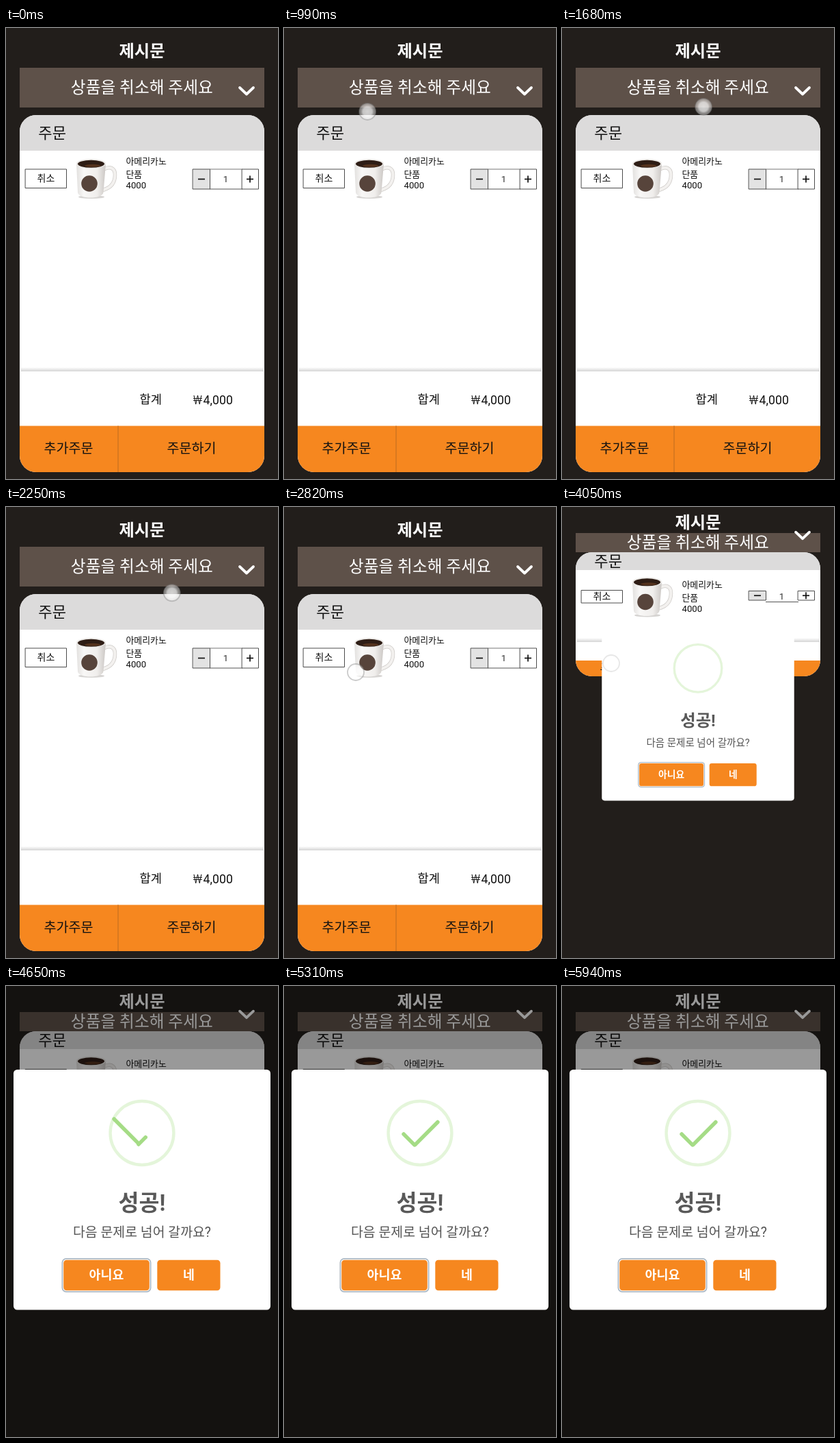
Recreate the animation shown at these times as an HTML page with a canvas. Size 398 by 658 pixels, loop 5970 ms.

```html
<!DOCTYPE html>
<html lang="ko">
<head>
<meta charset="utf-8">
<style>
html, body { margin: 0; width: 100%; height: 100%; overflow: hidden; background: #221e1b; }
canvas { display: block; width: 398px; height: 658px; }
</style>
</head>
<body>
<canvas id="stage"></canvas>
<script>
const W = 398, H = 658, LOOP = 5970;
const POPUP_AT = 4034, DIM_AT = 4055, CHECK_AT = 4133;
const EM = 17.69;
const FONT = "Roboto, 'Noto Sans CJK KR', 'Noto Sans CJK', sans-serif";
const ORANGE = '#f6871f';

const canvas = document.getElementById('stage');
const ctx = canvas.getContext('2d');
const dpr = window.devicePixelRatio || 1;
canvas.width = W * dpr;
canvas.height = H * dpr;

// Vertical positions of the page, before and after the body collapses
const FULL = {
  title: 33.3, bar: 58, barEnd: 116, prompt: 86.3, chevron: 91.5,
  card: 127, head: 179, headText: 153, total: 501, totalText: 541.3,
  foot: 580.5, end: 648, footText: 613.3,
  cancel: 206, cancelEnd: 233.5, mug: 0, info: 0,
  qty: 206, qtyEnd: 235, inputEnd: 235, qtyText: 220.5
};
const FLAT = {
  title: 22.8, bar: 38, barEnd: 66, prompt: 51.3, chevron: 41.2,
  card: 66, head: 92, headText: 79, total: 197, totalText: 210,
  foot: 224, end: 247, footText: 235,
  cancel: 121.5, cancelEnd: 140, mug: -88.5, info: -81.5,
  qty: 122.5, qtyEnd: 136, inputEnd: 138.5, qtyText: 130
};

// Touch path: time, x, y
const PATH = [
  [750, 94, 122], [990, 122, 122], [1680, 207, 115], [2130, 255, 115],
  [2820, 105, 241], [3300, 72, 228], [4200, 72, 228]
];

const clamp = v => Math.max(0, Math.min(1, v));
const mix = (a, b, k) => a + (b - a) * k;

// CSS "ease": cubic-bezier(.25, .1, .25, 1)
function ease(x) {
  const bez = (a, b, u) => 3 * a * u * (1 - u) ** 2 + 3 * b * u * u * (1 - u) + u ** 3;
  let lo = 0, hi = 1;
  for (let i = 0; i < 24; i++) {
    const mid = (lo + hi) / 2;
    if (bez(.25, .25, mid) < x) lo = mid; else hi = mid;
  }
  return bez(.1, 1, lo);
}

// Keys are [offset, ...values]; each segment is eased on its own
function keyframes(keys, p, curve = ease) {
  if (p <= keys[0][0]) return keys[0].slice(1);
  for (let i = 1; i < keys.length; i++) {
    const a = keys[i - 1], b = keys[i];
    if (p <= b[0]) {
      const k = curve((p - a[0]) / (b[0] - a[0]));
      return a.slice(1).map((v, j) => mix(v, b[j + 1], k));
    }
  }
  return keys[keys.length - 1].slice(1);
}

function text(str, x, cy, size, { color = '#111', weight = 400, align = 'left', mid = .355 } = {}) {
  ctx.font = `${weight} ${size}px ${FONT}`;
  ctx.fillStyle = color;
  ctx.textAlign = align;
  ctx.fillText(str, x, cy + mid * size);
}

function rect(x, y, x2, y2, color) {
  ctx.fillStyle = color;
  ctx.fillRect(x, y, x2 - x, y2 - y);
}

function frame(x, y, x2, y2, color = '#4c4c4c') {
  ctx.strokeStyle = color;
  ctx.lineWidth = 1;
  ctx.strokeRect(x, y, x2 - x, y2 - y);
}

function round(x, y, x2, y2, r, color) {
  ctx.beginPath();
  ctx.roundRect(x, y, x2 - x, y2 - y, r);
  ctx.fillStyle = color;
  ctx.fill();
}

function line(points, width, color, cap = 'butt') {
  ctx.beginPath();
  points.forEach(([x, y]) => ctx.lineTo(x, y));
  ctx.strokeStyle = color;
  ctx.lineWidth = width;
  ctx.lineCap = cap;
  ctx.lineJoin = cap === 'round' ? 'round' : 'miter';
  ctx.stroke();
}

function ellipse(x, y, rx, ry, color) {
  ctx.beginPath();
  ctx.ellipse(x, y, rx, ry, 0, 0, 7);
  ctx.fillStyle = color;
  ctx.fill();
}

function mug(dy) {
  ctx.save();
  ctx.translate(0, dy);
  ellipse(125, 246.5, 19, 2.5, '#d6d4d2');

  const handle = new Path2D('M143 206 C153 201 159.5 205 159.5 214 C159.5 226 153 233 143 236');
  ctx.lineCap = 'round';
  ctx.strokeStyle = '#cfccc9';
  ctx.lineWidth = 5.5;
  ctx.stroke(handle);
  ctx.strokeStyle = '#f3f1ef';
  ctx.lineWidth = 4;
  ctx.stroke(handle);

  const shade = ctx.createLinearGradient(103, 0, 146, 0);
  shade.addColorStop(0, '#e2e0de');
  shade.addColorStop(.25, '#f8f7f6');
  shade.addColorStop(.7, '#f0eeec');
  shade.addColorStop(1, '#cbc7c4');
  ctx.fillStyle = shade;
  ctx.fill(new Path2D('M103 198 L105 240 C106 250 141 250 142.5 240 L146 198 Z'));

  ellipse(124.5, 198, 21.5, 7, '#eae8e5');
  ellipse(124.5, 198.3, 19.5, 5.5, '#2e1d15');
  ellipse(127, 200.8, 12, 2, '#54321d');
  ellipse(122, 227, 11.8, 11.8, '#57443b');
  ctx.restore();
}

function quantity(L) {
  const y = (L.qty + L.qtyEnd) / 2;
  rect(274, L.qty, 298.5, L.qtyEnd, '#e3e3e3');
  frame(273.5, L.qty, 298.5, L.qtyEnd);
  frame(345.5, L.qty, 369.5, L.qtyEnd);
  if (L === FULL) line([[298, L.qty], [346, L.qty]], 1, '#777');
  line([[298, L.inputEnd], [346, L.inputEnd]], 1, '#555');
  line([[281, y], [291, y]], 1.7, '#111');
  line([[352, y], [362, y]], 1.7, '#111');
  line([[357, y - 5], [357, y + 5]], 1.7, '#111');
  text('1', 321.5, L.qtyText, 13.3, { align: 'center', color: '#333' });
}

function page(L) {
  const center = { align: 'center' };
  rect(0, 0, W, H, '#221e1b');
  text('제시문', 199, L.title, 24.3, { ...center, color: '#fff', weight: 700 });
  rect(20, L.bar, 378, L.barEnd, '#5e5149');
  text('상품을 취소해 주세요', 198.8, L.prompt, 23.7, { ...center, color: '#fff' });
  const c = L.chevron;
  line([[342, c - 4.5], [352, c + 5], [362, c - 4.5]], 3.8, '#fff', 'round');

  ctx.save();
  ctx.beginPath();
  ctx.roundRect(20, L.card, 358, L.end - L.card, 24);
  ctx.clip();
  rect(20, L.card, 378, L.end, '#fff');
  rect(20, L.card, 378, L.head, '#dcdbdb');
  text('주문', 47.3, L.headText, 22.1);

  const shadow = ctx.createLinearGradient(0, L.total - 6, 0, L.total);
  shadow.addColorStop(0, 'rgba(0,0,0,0)');
  shadow.addColorStop(1, 'rgba(0,0,0,.17)');
  rect(22, L.total - 6, 377, L.total, shadow);
  text('합계', 195.5, L.totalText, 17.6);
  text('₩', 273.8, L.totalText + 1, 17.7, { weight: 300 });
  text('4,000', 288.6, L.totalText + 1, 17.7);

  rect(20, L.foot, 378, L.end, ORANGE);
  line([[164, L.foot], [164, L.end]], 1.5, '#cf7420');
  text('추가주문', 91.5, L.footText, 19.6, center);
  text('주문하기', 271.5, L.footText, 19.6, center);
  ctx.restore();

  frame(28.5, L.cancel, 88.5, L.cancelEnd);
  text('취소', 58.5, (L.cancel + L.cancelEnd) / 2 - .4, 14, center);
  mug(L.mug);
  text('아메리카노', 175.5, 194.5 + L.info, 12.9);
  text('단품', 175.5, 213.5 + L.info, 12.9);
  text('4000', 175.5, 229.5 + L.info, 13.2);
  quantity(L);
}

function bar(cx, cy, width, angle) {
  if (width <= 0) return;
  ctx.save();
  ctx.translate(199 + (cx - 2.5) * EM, 214.5 + (cy - 2.5) * EM);
  ctx.rotate(angle);
  const w = width * EM / 2, h = .3125 * EM / 2;
  round(-w, -h, w, h, Math.min(.125 * EM, w), '#a5dc86');
  ctx.restore();
}

function check(t) {
  ctx.beginPath();
  ctx.arc(199, 214.5, 2.625 * EM, 0, 7);
  ctx.strokeStyle = 'rgba(165,220,134,.3)';
  ctx.lineWidth = .25 * EM;
  ctx.stroke();

  const p = clamp((t - CHECK_AT) / 750);
  const [left, top, tip] = keyframes([
    [0, .0625, 1.1875, 0], [.54, .125, 1.0625, 0], [.7, -.375, 2.1875, 3.125],
    [.84, 1.3125, 3, 1.0625], [1, .8125, 2.875, 1.5625]
  ], p);
  const [right, topL, long] = keyframes([
    [0, 2.875, 3.375, 0], [.65, 2.875, 3.375, 0],
    [.84, 0, 2.1875, 3.4375], [1, .5, 2.375, 2.9375]
  ], p);
  bar(left + tip / 2, top + .156, tip, Math.PI / 4);
  bar(5 - right - long / 2, topL + .156, long, -Math.PI / 4);
}

function popup(t) {
  const [scale] = keyframes([[0, .7], [.45, 1.05], [.8, .95], [1, 1]], clamp((t - POPUP_AT) / 300));
  const center = { align: 'center' };
  const label = { ...center, color: '#fff', weight: 700 };
  ctx.save();
  ctx.translate(199, 297.2);
  ctx.scale(scale, scale);
  ctx.translate(-199, -297.2);
  round(11, 122, 387, 472.5, 5.5, '#fff');
  check(t);
  text('성공!', 199, 316, 32.6, { ...center, color: '#595959', weight: 600 });
  text('다음 문제로 넘어 갈까요?', 199, 359.2, 19.4, { ...center, color: '#545454' });
  round(81.5, 397, 212.5, 447, 6.5, '#adbac6');
  round(83.3, 398.8, 210.7, 445.2, 5, '#fff');
  round(84.2, 399.7, 209.8, 444.3, 4.5, ORANGE);
  round(221.3, 399.7, 313.5, 444.3, 4.5, ORANGE);
  text('아니요', 147, 421.8, 18.4, label);
  text('네', 267.5, 421.8, 18.4, label);
  ctx.restore();
}

function touch(t) {
  const alpha = clamp((t - 750) / 80) * (1 - clamp((t - 3990) / 110));
  if (alpha <= 0) return;
  const smooth = k => k * k * (3 - 2 * k);
  const [x, y] = keyframes(PATH, t, t > 2130 ? smooth : k => k);
  ctx.save();
  ctx.globalAlpha = alpha;
  const glow = ctx.createRadialGradient(x, y, 0, x, y, 12);
  glow.addColorStop(0, 'rgba(255,255,255,.8)');
  glow.addColorStop(.55, 'rgba(255,255,255,.74)');
  glow.addColorStop(.8, 'rgba(255,255,255,.48)');
  glow.addColorStop(1, 'rgba(255,255,255,.38)');
  ellipse(x, y, 12, 12, glow);
  ctx.beginPath();
  ctx.arc(x, y, 12, 0, 7);
  ctx.strokeStyle = 'rgba(130,130,130,.42)';
  ctx.lineWidth = 1.8;
  ctx.stroke();
  ctx.restore();
}

function draw(t) {
  ctx.setTransform(dpr, 0, 0, dpr, 0, 0);
  const open = t >= POPUP_AT;
  page(open ? FLAT : FULL);
  if (open) {
    const dim = .4 * ease(clamp((t - DIM_AT) / 100));
    rect(0, 0, W, H, `rgba(0,0,0,${dim})`);
    popup(t);
  }
  touch(t);
}

const start = performance.now();
function tick() {
  draw((performance.now() - start) % LOOP);
  requestAnimationFrame(tick);
}
tick();
</script>
</body>
</html>
```
